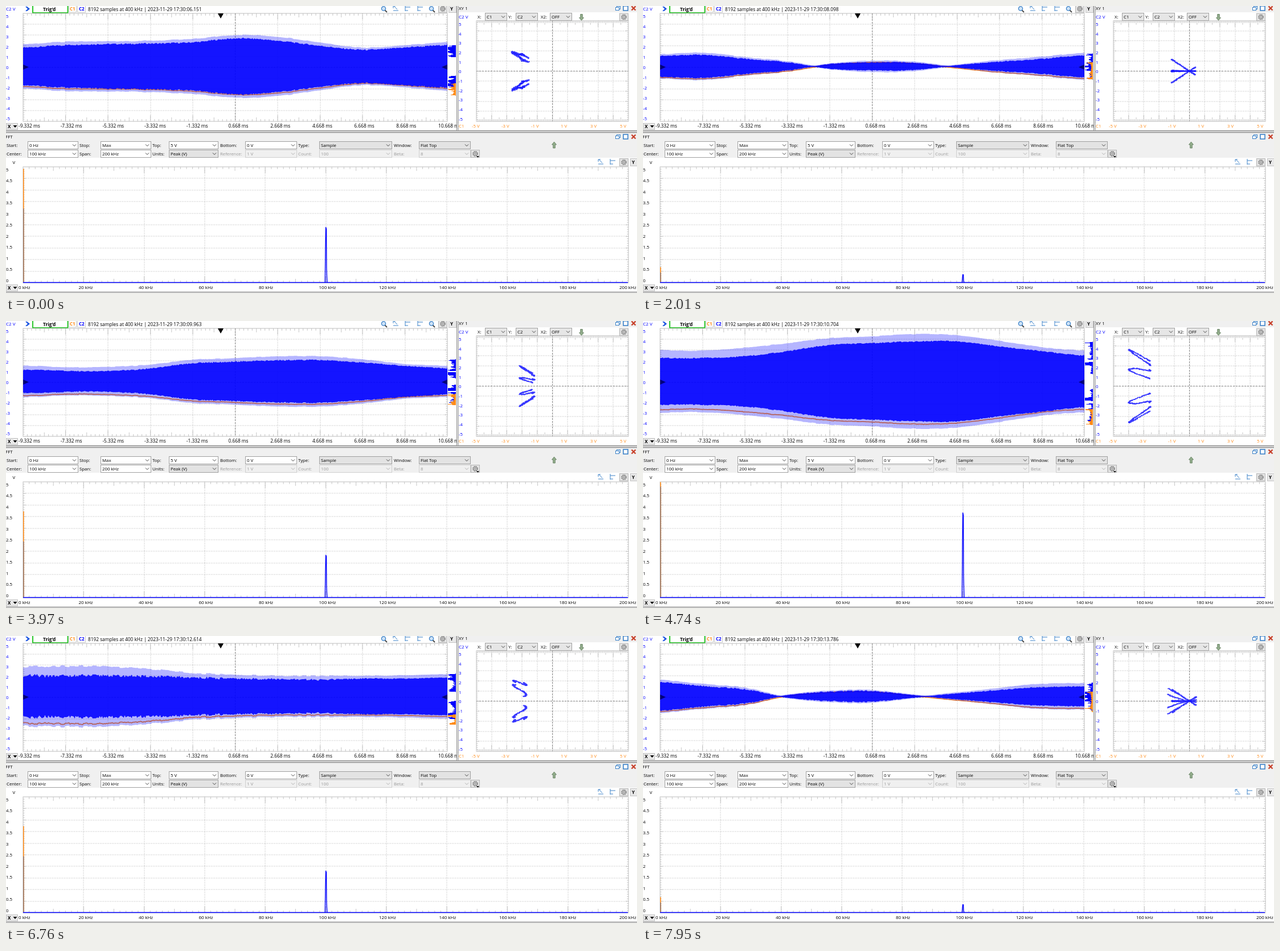
Animation, 1108 px wide and 505 px high, one loop 8000 ms. Source, as an HTML page with a canvas:

```html
<!DOCTYPE html>
<html lang="en">
<head>
<meta charset="utf-8">
<title>Oscilloscope</title>
<style>
  html, body { margin: 0; width: 100%; height: 100%; overflow: hidden; background: #fff; }
  svg, canvas { position: absolute; left: 0; top: 0; width: 1108px; height: 505px; display: block; }
  text { font-family: "Open Sans", "Noto Sans", sans-serif; white-space: pre; }
</style>
</head>
<body>
<svg id="ui" viewBox="0 0 1108 505" xmlns="http://www.w3.org/2000/svg"></svg>
<canvas id="plot" width="1108" height="505"></canvas>
<script>
const ui = document.getElementById('ui');
const ctx = document.getElementById('plot').getContext('2d');
const BLUE = '#0000ff', ORANGE = '#ff8c1a', PANEL = '#f0f0f0', ICON = '#3c82c8';

// ---------- static interface ----------
function add(tag, attrs) {
  const el = document.createElementNS('http://www.w3.org/2000/svg', tag);
  for (const k in attrs) el.setAttribute(k, attrs[k]);
  return ui.appendChild(el);
}
const rect = (x, y, width, height, fill, stroke = 'none') => add('rect', { x, y, width, height, fill, stroke });
const path = (d, stroke, width = 1, fill = 'none', dash = '') =>
  add('path', { d, stroke, 'stroke-width': width, fill, 'stroke-dasharray': dash });
function label(x, y, str, fill = '#000', size = 7.8, weight = 400) {
  const el = add('text', { x, y: y + size * 0.36, fill, 'font-size': size, 'font-weight': weight });
  el.textContent = str;
  return el;
}

function grid(x0, y0, x1, y1, axes) {
  const w = x1 - x0, h = y1 - y0;
  let lines = '', ticks = '';
  for (let i = 1; i < 10; i++) {
    lines += `M${x0 + Math.round(w * i / 10)} ${y0}V${y1}M${x0} ${y0 + Math.round(h * i / 10)}H${x1}`;
  }
  for (let i = 1; i < 100; i++) {
    const len = i % 10 === 0 ? 11 : i % 5 === 0 ? 7 : 4, x = x0 + w * i / 100;
    ticks += `M${x} ${y0}v${len}M${x} ${y1}v${-len}`;
  }
  for (let i = 1; i < 50; i++) {
    const len = i % 5 === 0 ? 5 : 2.5, y = y0 + h * i / 50;
    ticks += `M${x0} ${y}h${len}M${x1} ${y}h${-len}`;
  }
  path(lines, '#aaaaaa', 1, 'none', '1 2');
  path(ticks, '#b8b8b8', 0.8);
  rect(x0, y0, w, h, 'none', '#bdbdbd');
  if (axes) path(`M${x0 + w / 2} ${y0}V${y1}M${x0} ${y0 + h / 2}H${x1}`, '#8c8c8c', 1, 'none', '3 2');
}

function combo(x, y, w, str, fill = '#fff', off = false) {
  rect(x + 0.5, y - 6.5, w, 13, fill, off ? '#cfcfcf' : '#a0a0a0');
  label(x + 3, y, str, off ? '#9a9a9a' : '#000');
  path(`M${x + w - 9} ${y - 1.5}l3 3l3 -3`, off ? '#b0b0b0' : '#444');
}

function gear(x, y, boxed = true) {
  if (boxed) rect(x - 7.5, y - 6.5, 15, 13, '#e4e4e4', '#b4b4b4');
  add('circle', { cx: x, cy: y, r: 3.8, fill: '#ccc', stroke: '#777', 'stroke-width': 1.8, 'stroke-dasharray': '2 1' });
  add('circle', { cx: x, cy: y, r: 1.3, fill: '#fff', stroke: '#666', 'stroke-width': 0.7 });
}
function lens(x, y) {
  path(`M${x + 2} ${y + 2}l4 4`, '#444', 1.8);
  add('circle', { cx: x, cy: y - 0.5, r: 3.6, fill: '#cfe4f8', stroke: ICON, 'stroke-width': 1.3 });
}
const pointer = (x, y) => path(`M${x - 4} ${y + 4}h9M${x + 3} ${y + 2}l-6 -6M${x - 4} ${y}v-4h4`, ICON);
const flag = (x, y) => path(`M${x - 4} ${y - 5}v10M${x - 4} ${y - 2}h9M${x - 4} ${y + 4}h5`, ICON);
function button(x, y, w, h, str) {
  rect(x + 0.5, y + 0.5, w, h, '#e8e8e8', '#c4c4c4');
  label(x + 3, y + h / 2 + 0.5, str, '#000', 8, 700);
}
function xButton(y) {
  button(0, y, 20, 11, 'X');
  path(`M12.5 ${y + 4}h7l-3.5 4z`, 'none', 0, '#000');
}
function windowIcons(y) {
  rect(1072.5, y - 3.5, 6, 5, '#fff', ICON);
  rect(1070.5, y - 1.5, 6, 5, '#fff', ICON);
  rect(1084, y - 4, 8, 8, '#fff', ICON).setAttribute('stroke-width', 1.6);
  path(`M1098.5 ${y - 3.5}l7 7m0 -7l-7 7`, '#c8422c', 2.4);
}
const arrow = (x, y, d) =>
  path(`M${x} ${y + 6 * d}l-4 ${-5 * d}h2.2v${-6 * d}h3.6v${6 * d}h2.2z`, '#5c7a58', 0.8, '#93ad8c');

// panels
rect(794, 0, 314, 11, PANEL);
rect(0, 219, 1108, 48, PANEL);
rect(791, 0, 4, 219, PANEL);
path('M0 219.5H1108M0 222.5H1108M0 503.5H1108', '#8a8a8a', 1.4);
path('M791.5 0V219M794 0V219', '#8f8f8f');

// time plot
label(0, 5, 'C2 V', BLUE, 8);
path('M34 1h3l5 4l-5 4h-3l4 -4z', 'none', 0, '#1c55e0');
rect(47, -2, 61.5, 14, '#fff', '#18c018').setAttribute('stroke-width', 1.8);
label(65, 5.5, "Trig'd", '#000', 8.3, 700);
rect(110.5, -1, 13, 12, '#fff', '#c8c8c8');
label(112, 5.5, 'C1', ORANGE, 8, 700);
rect(125.5, -1, 14, 12, '#fff', '#c8c8c8');
label(128, 5.5, 'C2', BLUE, 8, 700);
const stamp = label(144, 5.5, '', '#000', 8.3);
lens(663, 5); pointer(684, 4); flag(705, 4); flag(727, 4); lens(747, 5); gear(767, 5);
button(777, -1, 13, 12, 'Y');
grid(30, 13, 775, 203, true);
for (let v = 5; v >= -5; v--) label(0, 108 - 18 * v, String(v), BLUE);
for (let i = 0; i <= 10; i++) label(22 + 73.7 * i, 211.5, (2 * i - 9.332).toFixed(3) + ' ms', '#000', 8.3);
rect(791, 205, 4, 14, PANEL);
rect(794.5, 204, 30, 14, '#fff');
path('M791.5 204V219M794 204V219', '#8f8f8f');
xButton(206);

// XY plot
label(795, 4.5, 'XY 1', '#000', 8);
windowIcons(4);
label(795, 19.5, 'C2 V', BLUE, 8);
[['X:', 828, 'C1', 841], ['Y:', 882, 'C2', 895], ['X2:', 939, 'OFF', 955]].forEach(([s, x, v, bx]) => {
  label(x, 19.5, s);
  combo(bx, 19, 38, v, '#e6e6e6');
});
arrow(1010.5, 19.5, 1);
gear(1085, 19.5);
grid(826, 26, 1093, 203, true);
for (let v = 5; v >= -5; v--) label(795, 115.5 - 16.7 * v, String(v), BLUE);
label(795, 211.5, 'C1', ORANGE);
for (let i = 0; i < 6; i++) label(818 + 52 * i, 211.5, 2 * i - 5 + ' V', ORANGE);

// FFT plot
label(-1, 230, 'FFT', '#000', 8);
windowIcons(230);
const GREY = '#e3e3e3';
[ [1, 38, 88, ['Start:', '0 Hz'], ['Center:', '100 kHz']],
  [129, 166, 88, ['Stop:', 'Max'], ['Span:', '200 kHz']],
  [257, 286, 86, ['Top:', '5 V'], ['Units:', 'Peak (V)', GREY]],
  [376, 420, 90, ['Bottom:', '0 V'], ['Reference:', '1 V', PANEL, true]],
  [513, 550, 127, ['Type:', 'Sample', GREY], ['Count:', '100', PANEL, true]],
  [681, 725, 90, ['Window:', 'Flat Top', GREY], ['Beta:', '8', PANEL, true]]
].forEach(([lx, bx, w, ...rows]) => rows.forEach(([name, value, fill, off], i) => {
  label(lx, 245 + 15 * i, name, off ? '#9a9a9a' : '#000');
  combo(bx, 245 + 15 * i, w, value, fill, off);
}));
gear(824, 260);
path('M826 264h5l-2.5 2.5z', 'none', 0, '#000');
arrow(962.5, 245, -1);
label(11.5, 275, 'V');
pointer(1044, 274); flag(1065, 274); gear(1085, 275);
button(1096, 268, 13, 13, 'Y');
grid(30, 283, 1093, 487, false);
for (let i = 0; i <= 10; i++) {
  label(0, 288 + 19.5 * i, String(5 - i / 2));
  label(22 + 105.5 * i, 495.5, 20 * i + ' kHz', '#000', 8);
}
xButton(490);

// ---------- signal ----------
// step: update index, ms: clock past 17:30:00, env/core: signed outer and inner amplitude in px,
// phase: start and end angle in degrees, fft: carrier and DC height in px
const KEYS = [
  { step: 0, ms: 6151, phase: [57, 30], fft: [97, 200], rough: [2, 2],
    env: [38, 42, 43, 44, 47, 54, 51, 41, 32, 36, 41], core: [33, 37, 39, 40, 42, 49, 45, 36, 29, 33, 37] },
  { step: 29, ms: 8098, phase: [-2, 3], fft: [14, 27], rough: [1.5, 1.5],
    env: [20, 23, 15, 8, -4, -9, -7, 2, 10, 16, 22], core: [18, 20, 13, 7, -4, -7, -6, 2, 8, 13, 19] },
  { step: 46, ms: 9221, phase: [30, 14], fft: [18, 40], rough: [2, 1.5],
    env: [-4, -5, -5, -1, 10, 11, 8, 3, -1, -7, -7], core: [-3, -4, -5, -1, 9, 10, 7, 2, -1, -5, -5] },
  { step: 68, ms: 10704, phase: [38, 16], fft: [149, 300], rough: [1.8, 1.5],
    env: [54, 53, 58, 66, 75, 78, 82, 80, 70, 59, 53], core: [41, 41, 44, 53, 64, 67, 70, 70, 61, 53, 45] },
  { step: 84, ms: 11751, phase: [11, 40], fft: [115, 237], rough: [3, 1.5],
    env: [68, 62, 59, 58, 59, 61, 62, 64, 66, 69, 69], core: [60, 55, 52, 49, 48, 48, 48, 48, 48, 48, 48] },
  { step: 97, ms: 12614, phase: [41, 14], fft: [73, 152], rough: [5, 0.8],
    env: [51, 52, 51, 47, 40, 37, 35, 35, 35, 36, 38], core: [36, 36, 36, 35, 33, 31, 30, 29, 31, 31, 33] },
  { step: 114, ms: 13786, phase: [27, -2], fft: [14, 27], rough: [2, 1.5],
    env: [28, 21, 14, -2, -9, -10, -2, 6, 14, 21, 22], core: [25, 18, 12, -2, -8, -9, -2, 5, 11, 16, 17] }
];
const STARTS = [0, 70, 880, 1730, 2570, 3410, 4250, 5090, 5920, 6760, 7600, 8440];
const LOOP = 8000, MID = 106;

function stepAt(t) {
  if (t < 70) return 0;
  let g = 1;
  while (t >= STARTS[g + 1]) g++;
  return 12 * g - 11 + Math.floor((t - STARTS[g]) / (STARTS[g + 1] - STARTS[g]) * 12 + 0.01);
}
const hash = n => { const s = Math.sin(n * 12.9898) * 43758.5453; return s - Math.floor(s); };
const mix = (a, b, u) => a.map((v, i) => v + (b[i] - v) * u);

function stateAt(step) {
  let k = 0;
  while (k < KEYS.length - 2 && step >= KEYS[k + 1].step) k++;
  const a = KEYS[k], b = KEYS[k + 1], u = (step - a.step) / (b.step - a.step);
  const swell = 0.14 * Math.sin(Math.PI * u);
  const gain = i => 1 + swell * Math.sin(step * 1.7 + i * 0.55);
  const shape = key => mix(a[key], b[key], u).map((v, i) => v * gain(i));
  return {
    ms: Math.round(a.ms + (b.ms - a.ms) * u),
    env: shape('env'), core: shape('core'),
    phase: mix(a.phase, b.phase, u), rough: mix(a.rough, b.rough, u),
    fft: mix(a.fft, b.fft, u).map(v => v * gain(5))
  };
}

// Catmull-Rom through the eleven division points
function curve(p, u) {
  const i = Math.min(9, Math.floor(u * 10)), t = u * 10 - i;
  const b = p[i], c = p[i + 1], a = i ? p[i - 1] : b, d = i < 9 ? p[i + 2] : c;
  return b + 0.5 * t * (c - a + t * (2 * a - 5 * b + 4 * c - d + t * (3 * (b - c) + d - a)));
}

function band(pts, fill) {
  ctx.beginPath();
  pts.forEach(([x, a]) => ctx.lineTo(x, MID - a));
  pts.slice().reverse().forEach(([x, a]) => ctx.lineTo(x, MID + 0.5 + a));
  ctx.fillStyle = fill;
  ctx.fill();
}
function stroke(pts, color, width) {
  ctx.beginPath();
  pts.forEach(([x, y]) => ctx.lineTo(x, y));
  ctx.strokeStyle = color;
  ctx.lineWidth = width;
  ctx.lineJoin = 'round';
  ctx.stroke();
}
function fillPath(d, color) {
  ctx.fillStyle = color;
  ctx.fill(new Path2D(d));
}
function bars(bins, scale, color) {
  ctx.fillStyle = color;
  bins.forEach((n, y) => {
    const w = Math.min(14, n * scale);
    ctx.fillRect(790 - w, y, w, 1);
  });
}

function draw(step) {
  const s = stateAt(step);
  ctx.clearRect(0, 0, 1108, 505);
  stamp.textContent = '8192 samples at 400 kHz | 2023-11-29 17:30:' + (s.ms / 1000).toFixed(3).padStart(6, '0');

  const outer = [], inner = [], dc = [];
  const xy = [[], [], [], []], blueBins = [], orangeBins = [];
  const count = (bins, y) => { const r = Math.round(y); bins[r] = (bins[r] || 0) + 1; };
  for (let x = 30; x <= 775; x++) {
    const u = (x - 30) / 745, e = curve(s.env, u);
    const rough = (s.rough[0] + (s.rough[1] - s.rough[0]) * u) * Math.min(1, Math.abs(e) / 12 + 0.2);
    const slow = (hash((x >> 3) + step * 91) - 0.5) * rough * 0.7;
    const tooth = (hash((x >> 1) + step * 57) - 0.5) * rough;
    const c = 0.9 * e + 1.5 + slow * 0.7;
    outer.push([x, Math.abs(e) + 1 + slow + tooth * 0.2]);
    inner.push([x, Math.max(0.8, Math.abs(curve(s.core, u)) + tooth + slow * 0.5)]);
    dc.push([x, MID + c + tooth * 0.3]);
    if (x % 3) continue;
    const angle = (s.phase[0] + (s.phase[1] - s.phase[0]) * u) * Math.PI / 180;
    count(orangeBins, MID + c);
    [Math.cos(angle), -Math.cos(angle), Math.sin(angle), -Math.sin(angle)].forEach((f, i) => {
      const jx = (hash(x * 7 + i + step) - 0.5) * 3, v = c * f + (hash(x * 3 + i + step * 5) - 0.5) * 1.6;
      xy[i].push([959.5 - c * 26.7 / 19 + jx, 114.5 - v * 17.7 / 19]);
      count(blueBins, MID - v);
    });
  }

  stroke(dc, ORANGE, 1.8);
  band(outer, 'rgba(0,0,255,0.29)');
  band(inner, 'rgba(0,0,255,0.89)');
  fillPath('M30 103l10 4.5l-10 4.5zM775 103l-10 4.5l10 4.5z', '#00007a');
  fillPath('M372 13h10l-5 9z', '#000');

  bars(blueBins, 0.6, BLUE);
  bars(orangeBins, 0.6, ORANGE);
  xy.forEach(p => stroke(p, 'rgba(20,20,255,0.85)', 1.5));

  const [peak, level] = s.fft, base = 486.5;
  const top = Math.min(203, level), low = Math.min(203, level * 0.65);
  ctx.fillStyle = ORANGE;
  ctx.fillRect(30, base - top, 1.6, top);
  ctx.fillStyle = '#9a7868';
  ctx.fillRect(30, base - low, 1.6, low);
  stroke([[30, base], [1092, base]], BLUE, 1.4);
  stroke([[560.3, base], [560.9, base - peak * 0.6], [561.6, base - peak], [562.5, base - peak * 0.97],
    [562.9, base - peak * 0.26], [563.8, base]], BLUE, 1.4);
}

let last = -1;
function tick() {
  const step = stepAt(performance.now() % LOOP);
  if (step !== last) draw(last = step);
  requestAnimationFrame(tick);
}
tick();
</script>
</body>
</html>
```
